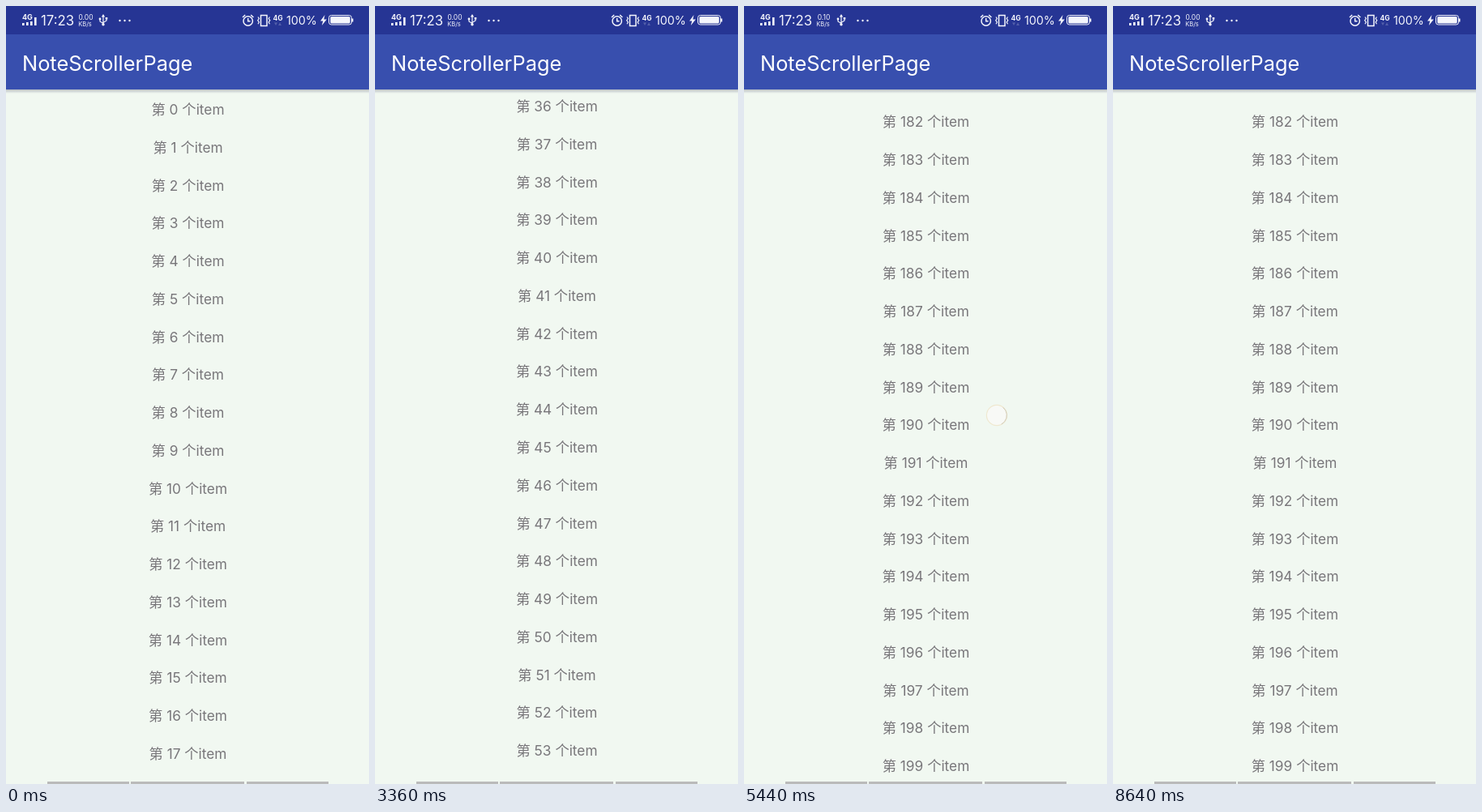
Animation of 448x960 px, one loop 8.8 s. Source, as an HTML page with a canvas:

```html
<!DOCTYPE html>
<html lang="zh">
<head>
<meta charset="utf-8">
<style>
  html, body { margin: 0; width: 100%; height: 100%; overflow: hidden; background: #f1f8f1; }
  canvas { display: block; }
</style>
</head>
<body>
<canvas id="stage" width="448" height="960"></canvas>
<script>
const ctx = document.getElementById('stage').getContext('2d');
const LOOP = 8800, STEP = 160, ROW = 46.76, ITEMS = 200;
const DRAG_TIME = 160, DRAG = 140;

// start, duration, scroll offset reached, finger x, finger y
const swipes = [
  [160, 1000, 618, 330, 640],
  [1440, 560, 0, 325, 400],
  [2240, 720, 900, 325, 640],
  [2960, 720, 2001, 325, 640],
  [3680, 640, 4300, 325, 631],
  [4320, 560, 6800, 318, 640],
  [4880, 400, 8495, 315, 640],
  [5280, 320, 8495, 312, 645],
];

function pose(t) {
  let scroll = 0, finger = null;
  for (const [start, duration, to, x, y] of swipes) {
    if (t < start) break;
    const age = t - start, total = to - scroll, dir = total < 0 ? -1 : 1;
    const drag = dir * Math.min(DRAG, Math.abs(total));
    const held = Math.min(1, age / DRAG_TIME);
    const p = Math.min(1, Math.max(0, (age - DRAG_TIME) / (duration - DRAG_TIME)));
    finger = age <= DRAG_TIME ? { x, y: y - dir * DRAG * held } : null;
    scroll += drag * held + (total - drag) * (1 - (1 - p) ** 2);
  }
  return { scroll, finger };
}

function text(str, x, y, size, weight = 400, align = 'left') {
  ctx.font = `${weight} ${size}px Inter, "Noto Sans CJK SC", "Noto Sans CJK", sans-serif`;
  ctx.textAlign = align;
  ctx.fillText(str, x, y);
}

function rect(x, y, w, h, color) {
  ctx.fillStyle = color;
  ctx.fillRect(x, y, w, h);
}

function dot(x, y, r) {
  ctx.beginPath();
  ctx.arc(x, y, r, 0, 7);
  ctx.fill();
}

function line(d, width = 1.3) {
  ctx.lineWidth = width;
  ctx.stroke(new Path2D(d));
}

function drawList(scroll) {
  ctx.fillStyle = '#78767a';
  const first = Math.max(0, Math.ceil((scroll - 20) / ROW));
  for (let i = first; i < Math.min(ITEMS, first + 21); i++) {
    text(`第 ${i} 个item`, 224.5, Math.round(134 + i * ROW - scroll), 17.3, 400, 'center');
  }
  for (const [x, w] of [[51, 101], [154, 140], [297, 101]]) rect(x, 957, w, 3, '#bababa');
}

function drawFinger({ x, y }) {
  ctx.fillStyle = '#efe8d0';
  dot(x, y, 13.2);
  ctx.fillStyle = '#f8f9f6';
  dot(x, y, 12);
  ctx.strokeStyle = '#c9c3b2';
  ctx.lineWidth = 0.8;
  ctx.beginPath();
  ctx.arc(x, y, 12.3, -0.9, 1.1);
  ctx.stroke();
}

function drawBars() {
  const shadow = ctx.createLinearGradient(0, 103, 0, 108);
  shadow.addColorStop(0, 'rgba(60,60,90,.3)');
  shadow.addColorStop(1, 'rgba(60,60,90,0)');
  rect(0, 103, 448, 5, shadow);
  rect(0, 0, 448, 35, '#263594');
  rect(0, 35, 448, 68, '#384fae');
  ctx.fillStyle = '#fff';
  text('NoteScrollerPage', 20, 79.5, 25.4);
}

function drawStatus(t) {
  ctx.fillStyle = ctx.strokeStyle = '#f4f5fc';
  text('4G', 20, 16.5, 9, 700);
  [3, 4, 5, 10].forEach((h, i) => ctx.fillRect(20 + i * 5, 24 - h, 2.6, h));
  text('17:23', 43, 24, 16.8);
  text(t >= 4480 && t < 8000 ? '0.10' : '0.00', 98.5, 16.5, 8.5, 400, 'center');
  text('KB/s', 97.5, 24.5, 7.5, 400, 'center');

  // USB
  line('M120 13V23M116 16V19L120 21.5M124 15.5V18L120 20.5', 1.2);
  ctx.fill(new Path2D('M120 10l2.2 3.5h-4.4zM122.7 14h2.6v2.6h-2.6z'));
  dot(116, 16, 1.4);
  dot(120, 22.8, 1.7);
  for (const x of [140.5, 146.5, 152.5]) dot(x, 18, 1.2);

  // Alarm and vibration
  line('M293 18.5a5.7 5.7 0 1 0 11.4 0a5.7 5.7 0 1 0 -11.4 0M298.7 15v3.8h2.8M292 14l3.2-3M305.4 14l-3.2-3', 1.5);
  line('M314.5 11.5h7.5v13h-7.5z', 1.5);
  line('M311 13.5l1.3 2-1.6 2.2 1.6 2.3-1.3 2.2M325.5 13.5l-1.3 2 1.6 2.2-1.6 2.3 1.3 2.2', 1.2);

  text('4G', 329.5, 17.5, 8.5, 700);
  ctx.globalAlpha = t >= 3520 && t < 4160 ? 0.95 : 0.22;
  ctx.fill(new Path2D('M331 20.5h4l-2 3.5zM336 24h4l-2-3.5z'));
  ctx.globalAlpha = 1;
  text('100%', 346, 23, 14.3);

  // Charging battery
  ctx.fill(new Path2D('M393.5 11l-5.5 7.5h3.2l-1.4 5.5 6-7.5h-3.5z'));
  ctx.lineWidth = 1;
  ctx.beginPath();
  ctx.roundRect(398.5, 11.5, 28, 11.5, 3);
  ctx.stroke();
  ctx.beginPath();
  ctx.roundRect(400.3, 13, 24.4, 8.5, 1.5);
  ctx.fill();
  ctx.fillRect(427, 15.5, 1.5, 4);
}

function frame(now) {
  const t = Math.floor((now % LOOP) / STEP) * STEP;
  const { scroll, finger } = pose(t);
  rect(0, 0, 448, 960, '#f1f8f1');
  drawList(scroll);
  if (finger) drawFinger(finger);
  drawBars();
  drawStatus(t);
  requestAnimationFrame(frame);
}
requestAnimationFrame(frame);
</script>
</body>
</html>
```
